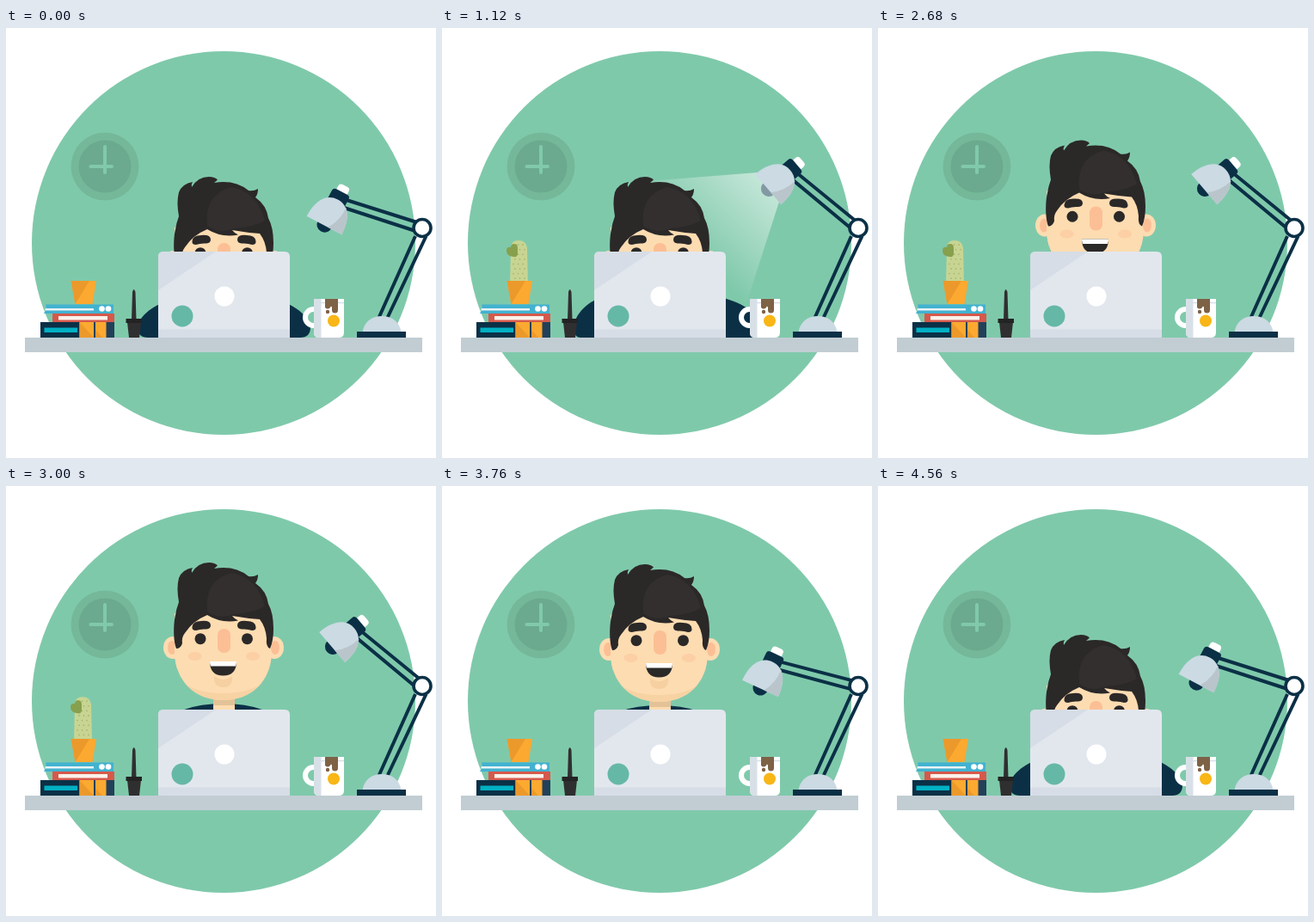
These frames come from a looping animation (500x500 px, 4.6 s). An HTML page:

```html
<!DOCTYPE html>
<html lang="en">
<head>
<meta charset="utf-8">
<title>Desk</title>
<style>
html, body { margin: 0; width: 100%; height: 100%; overflow: hidden; background: #fff; }
svg { display: block; width: 100vw; height: 100vh; }
.navy { fill: #0b3046; }
.hair { fill: #2b2828; }
.skin { fill: #fddcb1; }
.blush { fill: #fcbf95; }
.rod { stroke: #0b3046; stroke-width: 4; fill: none; }
.steam { stroke: #fff; stroke-width: 3; fill: none; stroke-linecap: round; }
</style>
</head>
<body>
<svg viewBox="0 0 500 500">
  <defs>
    <linearGradient id="beam" gradientUnits="userSpaceOnUse" x1="382" y1="182" x2="298" y2="266">
      <stop offset="0" stop-color="#fff" stop-opacity=".55"/>
      <stop offset="1" stop-color="#fff" stop-opacity="0"/>
    </linearGradient>
    <clipPath id="abovePot"><rect x="60" y="230" width="60" height="65"/></clipPath>
    <clipPath id="mugShape"><path d="M358 315H393V354Q393 360 387 360H364Q358 360 358 354Z"/></clipPath>
    <clipPath id="faceShape"><path id="facePath" d="M196 150Q252 120 309 150V194C309 230 284 251 252.500 251S196 230 196 194Z"/></clipPath>
    <path id="arm" d="M190 312C152 318 135 338 135 348Q135 360 147 360H190Z"/>
    <path id="wisp" class="steam" pathLength="100" d="M5 36C2 33 -1 29 2 24.500S5.500 17 2.500 13S1 5 5 1"/>
  </defs>

  <circle cx="253" cy="250" r="223" fill="#7fc9ab"/>

  <g id="clock">
    <circle cx="115" cy="161" r="39.500" fill="#75b899"/>
    <circle cx="115" cy="161" r="30.500" fill="#6baa8e"/>
    <path d="M115 138V168M98.500 161H123" stroke="#80c9aa" stroke-width="4" stroke-linecap="round"/>
  </g>

  <path id="light" d="M367 168L392 202L354 320L230 270L240 178Z" fill="url(#beam)"/>

  <g id="armL"><use href="#arm" class="navy"/></g>
  <g id="armR"><use href="#arm" class="navy" transform="matrix(-1 0 0 1 507 0)"/></g>

  <g id="body">
    <ellipse class="navy" cx="252.500" cy="279" rx="64" ry="24"/>
    <path d="M241 235H266V266H241Z" class="skin"/>
    <path d="M241 240H266V257H241Z" fill="#e3c298"/>
  </g>

  <g id="head">
    <g class="skin">
      <ellipse cx="194" cy="190" rx="11" ry="13"/>
      <ellipse cx="312" cy="190" rx="11" ry="13"/>
      <use href="#facePath"/>
    </g>
    <g class="blush">
      <ellipse cx="193" cy="190" rx="5" ry="8"/>
      <ellipse cx="313" cy="190" rx="5" ry="8"/>
    </g>
    <g clip-path="url(#faceShape)">
      <rect x="195" y="185" width="4" height="30" class="skin"/>
      <path d="M190 205Q200 243 252.500 243T315 205V255H190Z" fill="#f7d2a3"/>
    </g>
    <g fill="#fccfa5">
      <ellipse cx="219.500" cy="200" rx="8" ry="5"/>
      <ellipse cx="287" cy="200" rx="8" ry="5"/>
      <path d="M242 223Q252.500 231 263 223Q264 236 252.500 236T242 223Z" fill="#f6d0a0"/>
    </g>
    <rect x="246" y="168" width="15" height="28" rx="7" class="blush"/>
    <g id="eyes" class="hair">
      <circle cx="226" cy="179.700" r="6.500"/>
      <circle cx="280.500" cy="179.700" r="6.500"/>
    </g>
    <g class="hair">
      <path d="M216.500 166Q217 159 227 159Q238 158 238 164Q238 168 233 168.500Q226 168 221 170Q216 170 216.500 166Z"/>
      <path d="M290.500 166Q290 159 280 159Q269 158 269 164Q269 168 274 168.500Q281 168 286 170Q291 170 290.500 166Z"/>
    </g>
    <g id="smile">
      <path class="hair" d="M237 206H268Q268 222.500 252.500 222.500T237 206Z"/>
      <path d="M237 206H268Q268 209 267 211.500H238Q237 209 237 206Z" fill="#fff"/>
    </g>
    <circle id="ooh" class="hair" cx="253" cy="212.500" r="5.500"/>
    <g id="mop">
      <path class="hair" d="M198 191C194 180 195 160 197 152Q198 145 201 137Q198 120 201 109Q205 99 217 97Q215 100 216 103Q223 91 236 91Q243 91 246 94.500L242 98Q266 94 282 107Q288 108 293 105Q293 111 290 115Q303 124 305 139Q311 150 311 168Q311 182 307 191Q302 189 303 179Q302 166 295 157Q280 156 263 153Q266 157 270 158.500Q250 162 234 152Q217 159 208 173Q204 178 205 185Q203 191 198 191Z"/>
      <path d="M234 148Q230 112 262 103Q292 108 301 142Q286 150 266 151Q249 158 234 148Z" fill="#322f2e"/>
    </g>
  </g>

  <g id="laptop">
    <path d="M177 360V266Q177 260 183 260H324Q330 260 330 266V360Z" fill="#e2e7ee"/>
    <path d="M177 305V266Q177 260 183 260H244Z" fill="#d6dde6"/>
    <path d="M177 350.500H330V360H177Z" fill="#d7dde6"/>
    <circle cx="254" cy="312" r="11.500" fill="#fff"/>
    <circle cx="205" cy="335" r="12.500" fill="#66b8a6"/>
  </g>

  <g id="pen" fill="#302f30">
    <path d="M147 307Q148.500 301 150.500 307L151.500 340H146Z"/>
    <path d="M141 342H157L155 360H143Z"/>
    <path d="M139.500 338H158V343H139.500Z" fill="#232324"/>
  </g>

  <g clip-path="url(#abovePot)">
    <g id="cactus">
      <path d="M79 300L80 256Q80 247 89 247T99 256L100 300Z" fill="#c8d592"/>
      <g id="spots" fill="#a9b874"></g>
      <path d="M75 259Q75 254 80 255Q80 251 84 251Q88 251 88 256V262Q88 267 83 266Q75 265 75 259Z" fill="#87a04d"/>
    </g>
  </g>
  <path d="M75.500 294H105L100.500 321H80.500Z" fill="#fba930"/>
  <path d="M75.500 294H97L80.500 321Z" fill="#ec992b"/>

  <g id="books">
    <path d="M46 321.500H125V332H44Q48 327 46 321.500Z" fill="#42b2d0"/>
    <path d="M46 326H102V328.500H45Z" fill="#e9f3f6"/>
    <circle cx="111.500" cy="326.500" r="3.300" fill="#fff"/>
    <circle cx="119" cy="326.500" r="3.300" fill="#fff"/>
    <path d="M54 332H126V342.500H54Z" fill="#d5594b"/>
    <path d="M61 335H118V339.500H61Z" fill="#fbf1ea"/>
    <path d="M40 342H126V360H40Z" fill="#22405a"/>
    <path class="navy" d="M40 342H85.500V360H40Z"/>
    <path d="M44.500 348.500H83V354H44.500Z" fill="#00b0c3"/>
    <path d="M85.500 342H102V360H85.500ZM104 342H116.500V360H104Z" fill="#fba930"/>
    <path d="M85.500 342L102 360H85.500ZM104 351L112 360H104Z" fill="#ec992b"/>
  </g>

  <g id="mug">
    <circle cx="357.500" cy="336.500" r="9.500" fill="none" stroke="#fff" stroke-width="6"/>
    <g clip-path="url(#mugShape)">
      <rect x="358" y="315" width="35" height="45" fill="#fff"/>
      <rect x="358" y="315" width="8.500" height="45" fill="#d8e0e7"/>
      <path d="M358 319.500H393" stroke="#d8e0e7" stroke-width="1.500"/>
      <path d="M371 315H386V328Q386 331.500 382.500 331.500T379 328V325Q378 322 377 325Q374 328 371 325Z" fill="#7d6246"/>
      <circle cx="374" cy="330" r="2.200" fill="#7d6246"/>
    </g>
    <circle cx="381" cy="340.500" r="7" fill="#f8b617"/>
  </g>
  <g id="steam">
    <use href="#wisp" x="358.500" y="264"/>
    <use href="#wisp" x="371" y="264"/>
    <use href="#wisp" x="384" y="264"/>
  </g>

  <path class="rod" d="M433 338L476 242M443 338L488.500 242"/>
  <path d="M414.500 354C416 342 425 335 437 335S458 342 459.500 354Z" fill="#cbdae3"/>
  <path class="navy" d="M408 353H465V360H408Z"/>
  <g id="lamp">
    <path class="rod" d="M388 197.500L478 226M384 206L476 236"/>
    <g transform="translate(370 229.500) rotate(27.700)">
      <rect x="-7" y="-52" width="14" height="14" rx="4" fill="#fff"/>
      <rect x="-11" y="-44" width="22" height="18" rx="4" class="navy"/>
      <circle id="bulb" cy="-1" r="9"/>
      <path d="M-23 0C-23 -22 -14 -34 0 -34S23 -22 23 0Z" fill="#cbdae3"/>
      <path d="M5 0Q14 -14 13 -30Q23 -20 23 0Z" fill="#b9c5cb"/>
    </g>
  </g>
  <circle cx="484" cy="232.500" r="10" fill="#fff" stroke="#0b3046" stroke-width="3.600"/>

  <rect x="22" y="360" width="462" height="17" fill="#c1cdd3"/>
</svg>
<script>
const LOOP = 4600, STEP = 40, TAP = 560;
const $ = id => document.getElementById(id);

// Each track is a run of [time, value] pairs, eased in and out between them.
const tracks = {
  head: [[0, 82], [2360, 82], [2536, 88], [2830, -12], [3060, 0], [4000, 0], [4200, -4.5], [4440, 86], [4540, 82]],
  look: [[4000, 0], [4160, 1], [4240, 1], [4400, 0]],
  arms: [[0, 18], [240, 0], [2360, 0], [2560, 48], [4400, 48], [4540, 18]],
  lamp: [[120, 0], [520, 26], [760, 21.7], [3160, 21.7], [3400, 29.6], [3760, -3], [3900, 0]],
  light: [[780, 0], [920, 1], [1160, 1], [1360, 0]],
  cactus: [[120, 54], [440, -4], [560, 0], [2860, 0], [2960, -4], [3300, 54]]
};

const ease = p => p * p * (3 - 2 * p);
const ramp = (t, a, b) => ease(Math.min(1, Math.max(0, (t - a) / (b - a))));

function at(name, t) {
  const keys = tracks[name];
  let v = keys[0][1];
  for (let i = 1; i < keys.length; i++) {
    const [a, from] = keys[i - 1], [b, to] = keys[i];
    if (t >= a) v = from + (to - from) * ramp(t, a, b);
  }
  return v;
}

const move = (id, x, y) => $(id).setAttribute('transform', `translate(${x} ${y})`);
const show = (id, on) => $(id).setAttribute('visibility', on ? 'visible' : 'hidden');

function drawArms(t) {
  const inset = at('arms', t);
  const typing = Math.max(0, 1 - inset / 18);
  const squeeze = 1 - 0.33 * typing * (0.5 + 0.5 * Math.cos(2 * Math.PI * t / TAP));
  $('armL').setAttribute('transform', `translate(${190 + inset} 0) scale(${squeeze} 1) translate(-190 0)`);
  move('armR', -inset, 0);
}

function drawSteam(t) {
  const start = t < 3000 ? 1400 : 3820;
  const tip = 100 * ramp(t, start, start + 320);
  const tail = 100 * ramp(t, start + 300, start + 720);
  show('steam', tip - tail > 1);
  $('wisp').setAttribute('stroke-dasharray', `${Math.max(0, tip - tail)} 300`);
  $('wisp').setAttribute('stroke-dashoffset', -tail);
}

function draw(t) {
  const head = at('head', t), look = at('look', t), light = at('light', t);
  move('head', 0, head);
  move('body', 0, Math.min(head, 50));
  move('eyes', 0, 5.5 * look);
  move('mop', 0, -6 * look);
  move('cactus', 0, at('cactus', t));
  $('lamp').setAttribute('transform', `rotate(${at('lamp', t)} 484 232.5)`);
  $('light').setAttribute('opacity', light);
  $('bulb').setAttribute('fill', light > 0.5 ? '#8299a3' : '#0b3046');
  const round = t >= 4040;
  show('smile', !round);
  show('ooh', round);
  drawArms(t);
  drawSteam(t);
}

let spots = '';
for (let row = 0; row < 8; row++)
  for (let col = 0; col < 3; col++)
    spots += `<circle cx="${83 + col * 5.5 + row % 2 * 2}" cy="${252 + row * 5.6}" r="0.9"/>`;
$('spots').innerHTML = spots;

function frame() {
  const t = performance.now() % LOOP;
  draw(Math.floor(t / STEP) * STEP);
  requestAnimationFrame(frame);
}
frame();
</script>
</body>
</html>
```
